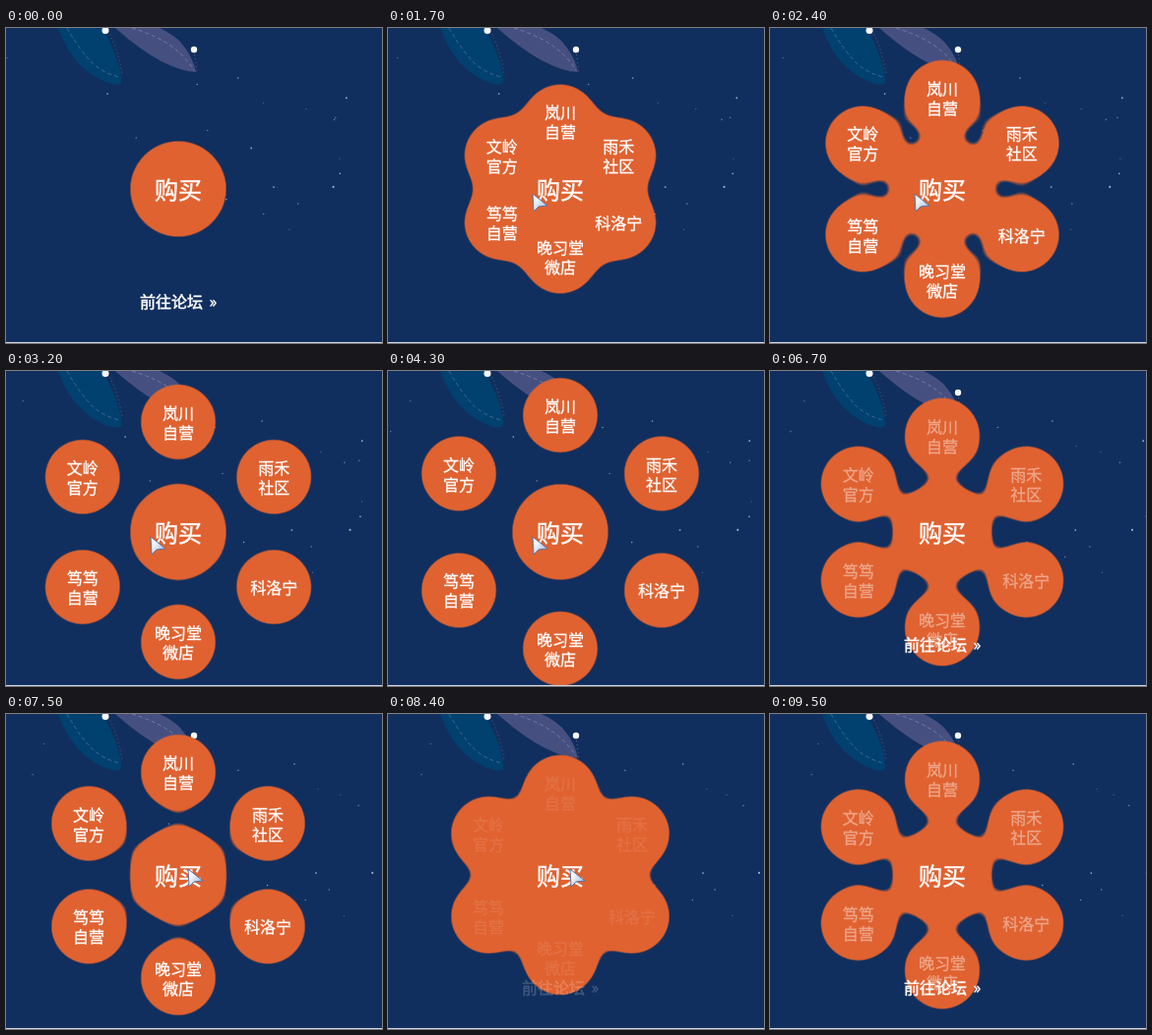
These frames come from a looping animation (382x321 px, 9.6 s). An HTML page:

```html
<!DOCTYPE html>
<html lang="zh-CN">
<head>
<meta charset="utf-8">
<style>
html, body { margin: 0; width: 100%; height: 100%; overflow: hidden; background: #112f5e; }
svg { display: block; }
text {
  font-family: "Noto Sans CJK SC", "Noto Sans CJK", "Noto Sans", sans-serif;
  fill: #fff;
  stroke: #fff;
  stroke-width: .3px;
  text-anchor: middle;
}
.petal {
  transform: translate(175px, 164px) rotate(var(--a)) translateY(calc(var(--d) * -1px)) rotate(calc(var(--a) * -1));
}
.label { font-size: 16px; }
#main { font-size: 24px; stroke-width: .5px; }
#link { font-size: 16px; stroke-width: .5px; word-spacing: 3px; }
.dash { fill: none; stroke-dasharray: 4 3; }
.dots { fill: none; stroke: #6b5878; stroke-dasharray: 1 3; }
</style>
</head>
<body>
<svg id="stage" width="382" height="321" viewBox="0 0 382 321">
  <defs>
    <filter id="goo" filterUnits="userSpaceOnUse" x="-40" y="-40" width="462" height="401" color-interpolation-filters="sRGB">
      <feGaussianBlur in="SourceGraphic" stdDeviation="12" result="blur"/>
      <feColorMatrix in="blur" values="1 0 0 0 0  0 1 0 0 0  0 0 1 0 0  0 0 0 19 -9" result="goo"/>
      <feComposite in="SourceGraphic" in2="goo" operator="atop"/>
    </filter>
    <linearGradient id="steel" x2="1" y2="1">
      <stop offset=".3" stop-color="#f4f8fd"/>
      <stop offset="1" stop-color="#8fa9d0"/>
    </linearGradient>
  </defs>

  <path d="M53 0Q67 39 97 53Q111 60 117 56Q118 36 98 0Z" fill="#004170"/>
  <path class="dash" d="M62 0Q75 23 88 36Q99 46 115 50" stroke="#3f6a8f"/>
  <path d="M111 0Q137 23 158 34Q180 45 193 45Q190 29 177 14Q169 6 156 0Z" fill="#465080"/>
  <path class="dash" d="M128 0Q154 8 170 20Q182 29 191 43" stroke="#747aa2"/>
  <path class="dots" d="M104 3Q114 22 118 47M191 23L194 45"/>
  <g id="stars" fill="#c3d0e2"></g>
  <circle cx="101" cy="2.5" r="3.5" fill="#f6f7fa"/>
  <circle cx="191" cy="22" r="3.2" fill="#f6f7fa"/>

  <g id="blobs" fill="#e06230" filter="url(#goo)">
    <circle cx="175" cy="164" r="50"/>
  </g>
  <g id="labels"></g>
  <text id="main" x="175" y="174">购买</text>
  <text id="link" x="175" y="285">前往论坛 »</text>
  <path id="cursor" d="M0 0L1 18L6 13L15 12Z" fill="url(#steel)" stroke="#5d719c" stroke-linejoin="round"/>
  <rect y="320" width="382" height="1" fill="#c9d1dd"/>
</svg>
<script>
const LOOP = 9.6, STEP = .1;
const OPEN = 113, HALF = 84, PEAK = 119.5;
const HOVERS = [[.2, 4.8], [5.5, 6.4], [6.95, 7.8], [8.35, 9.2]]; // seconds in, out

const $ = id => document.getElementById(id);
const clamp = v => Math.min(1, Math.max(0, v));
const mix = (a, b, u) => a + (b - a) * (1 - Math.cos(Math.PI * clamp(u))) / 2;

function add(parent, tag, attrs, text = "") {
  const el = document.createElementNS("http://www.w3.org/2000/svg", tag);
  for (const k in attrs) el.setAttribute(k, attrs[k]);
  el.textContent = text;
  return parent.appendChild(el);
}

let seed = 7;
const random = () => (seed = seed * 16807 % 2147483647) / 2147483647;

const stars = Array.from({ length: 22 }, () => {
  const star = { x: -30 + 400 * random(), speed: 3 + 5 * random() };
  const r = .5 + .6 * random();
  star.el = add($("stars"), "circle", { cy: 12 + 236 * random(), r, opacity: r * .8 });
  return star;
});

["岚川 自营", "雨禾 社区", "科洛宁", "晚习堂 微店", "笃笃 自营", "文岭 官方"].forEach((name, i) => {
  const style = `--a: ${i * 60}deg`;
  add($("blobs"), "circle", { class: "petal", style, r: 39.7 });
  const label = add($("labels"), "g", { class: "petal label", style });
  const lines = name.split(" ");
  lines.forEach((line, n) =>
    add(label, "text", { y: 17 - 10 * lines.length + 20 * n }, line));
});

// The first opening swings past its rest; later ones reverse a half-done closing.
function distance(t, i, since, hovering) {
  if (i < 0) return 0;
  const [start, end] = HOVERS[i];
  if (!hovering) return mix(OPEN, HALF, since / .6);
  return i ? mix(HALF, OPEN, since / (end - start)) : PEAK * Math.sin(since * .407);
}

function draw(t) {
  const i = HOVERS.findLastIndex(([start]) => t >= start);
  const hovering = i >= 0 && t < HOVERS[i][1];
  const since = i < 0 ? LOOP : t - HOVERS[i][hovering ? 0 : 1];

  $("stage").style.setProperty("--d", distance(t, i, since, hovering));
  $("labels").style.opacity = hovering ? clamp(since / .5) : Math.exp(-since / .36);
  $("link").style.opacity = hovering ? Math.exp(-since / .03) : clamp(since / .2);
  $("cursor").style.opacity = +hovering;
  $("cursor").setAttribute("transform", i > 0 ? "translate(185 158)" : "translate(147 169)");
  for (const { el, x, speed } of stars) el.setAttribute("cx", x + speed * t);
}

function tick() {
  const t = performance.now() / 1000 % LOOP;
  draw(Math.floor(t / STEP + .01) * STEP);
  requestAnimationFrame(tick);
}
tick();
</script>
</body>
</html>
```
